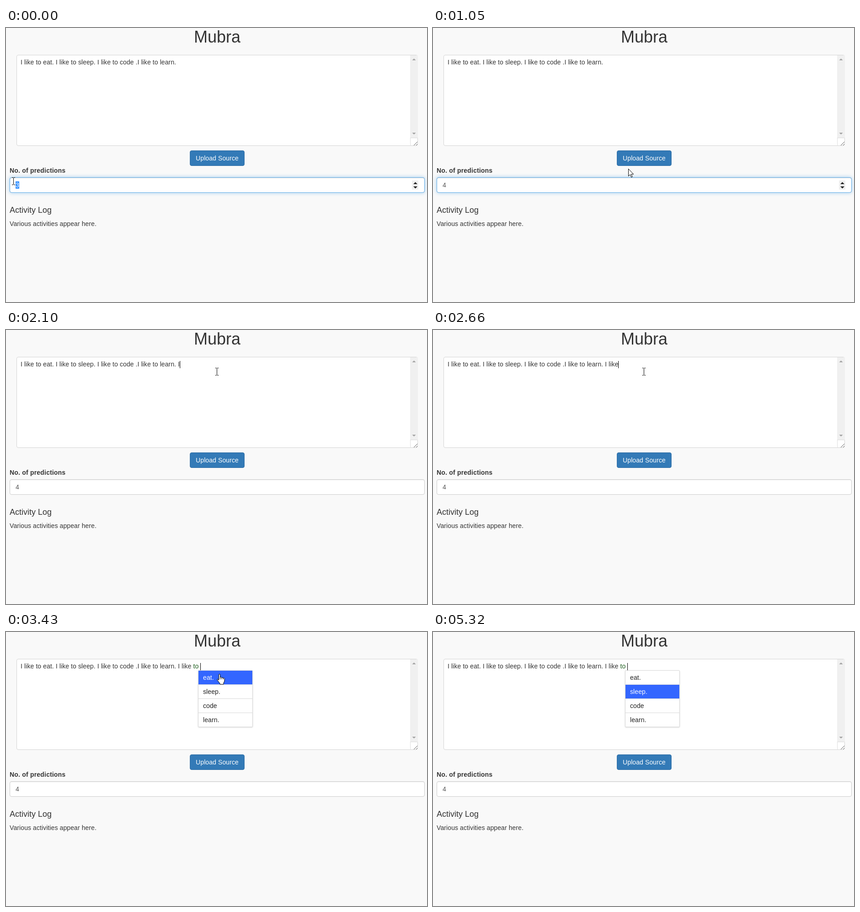
Animation, 923 px wide and 602 px high, one loop 5.53 s. Source, as an HTML page:

```html
<!DOCTYPE html>
<html lang="en">
<head>
<meta charset="utf-8">
<title>Mubra</title>
<style>
  * { box-sizing: border-box; }
  html, body { margin: 0; width: 100%; height: 100%; overflow: hidden; }
  body {
    position: relative; background: #f9f9f9; color: #333; font-kerning: none;
    font: 14px/20px "Liberation Sans", Arial, sans-serif; letter-spacing: .1px; white-space: pre;
  }
  body > * { position: absolute; margin: 0; }
  h1 { left: 0; top: 0; width: 926px; text-align: center; font: 36px/40px "Liberation Sans", sans-serif; letter-spacing: 0; }
  h4 { left: 8px; top: 390px; font: 18px/20px "Liberation Sans", sans-serif; letter-spacing: 0; }
  #area { left: 23px; top: 59px; width: 880px; height: 200px; background: #fff; border: 1px solid #d4d4d4; border-radius: 4px; }
  #text { left: 32px; top: 65px; }
  #typed b { font-weight: normal; color: #175a17; }
  .caret { display: inline-block; width: 1px; height: 16px; margin-right: -1px; background: #000; vertical-align: -4px; }
  #upload {
    left: 403px; top: 269px; width: 120px; height: 34px; line-height: 32px; text-align: center;
    color: #fff; background: #337ab7; border: 1px solid #2e6da4; border-radius: 4px;
  }
  #upload.hover { background: #286090; border-color: #204d74; }
  #label { left: 8px; top: 303px; font-weight: bold; letter-spacing: .2px; }
  .field { left: 8px; top: 328px; width: 910px; height: 34px; border: 1px solid #ccc; border-radius: 4px; }
  #count { background: #fff; box-shadow: inset 0 1px 1px rgba(0,0,0,.075); }
  #glow { border-color: #66afe9; box-shadow: inset 0 1px 1px rgba(0,0,0,.075), 0 0 8px rgba(102,175,233,.6); }
  #value { left: 21px; top: 337px; height: 16px; line-height: 16px; color: #555; }
  #value.selected { color: #fff; background: #3390ff; }
  #numCaret { left: 29px; top: 337px; }
  #popup { top: 84px; width: 120px; background: #fff; border: 1px solid #d8d8d8; border-radius: 2px; box-shadow: 0 1px 3px rgba(0,0,0,.15); color: #222; }
  #popup div { height: 31px; line-height: 30px; padding-left: 10px; border-bottom: 1px solid #d8d8d8; }
  #popup div:last-child { height: 30px; border: 0; }
  #popup .hover { color: #fff; background: #36f; }
  svg { left: 0; top: 0; }
</style>
</head>
<body>
<h1>Mubra</h1>
<div id="area"></div>
<div id="text">I like to eat. I like to sleep. I like to code .I like to learn. <span id="typed"></span><i id="caret" class="caret"></i></div>
<div id="upload">Upload Source</div>
<div id="label">No. of predictions</div>
<div id="count" class="field"></div>
<div id="glow" class="field"></div>
<div id="value"></div>
<i id="numCaret" class="caret"></i>
<h4>Activity Log</h4>
<div style="left:8px;top:420px">Various activities appear here.</div>
<svg width="923" height="602">
  <path fill="#f0f0f0" d="M886 60h17v182h-17z"/>
  <path fill="#a3a3a3" d="M890.5 71l4-4 4 4zM890.5 230l4 4 4-4z"/>
  <path fill="#fff" stroke="#dcdcdc" d="M886.5 258.5v-17h16"/>
  <path fill="none" stroke="#555" d="M894 258l8-8M899 258l3-3"/>
  <g id="spinner">
    <path fill="#f0f0f0" d="M890 335h14v20h-14z"/>
    <path fill="#222" d="M893 343l4.500-4.500 4.500 4.500zM893 348l4.500 4.500 4.500-4.500z"/>
  </g>
</svg>
<div id="popup"></div>
<svg width="923" height="602">
  <g id="pointer" stroke="#000" fill="#fff">
    <path id="arrow" d="M.5.5v16l3.700-3.500 2.600 5.800 2.400-1-2.600-5.600h5z"/>
    <path id="beam" fill="none" d="M-3-7.500h2.500l1 1 1-1H4M.5-6.500v14M-3 8.500h2.500l1-1 1 1H4"/>
    <path id="hand" d="M-1.500 14V2Q-1.500.5 0 .5T1.500 2V8Q2 6.500 3.500 7T5 9Q5.500 7.500 7 8T8.500 10Q9 8.500 10.500 9.500T11 12V16L9 20V23H1V21L-4.500 14Q-5.500 11.500-4 11.500T-1.500 14ZM1.500 8v4M5 9v3M8.500 10v2"/>
  </g>
</svg>
<script>
const LOOP = 5530;
const $ = id => document.getElementById(id);
const show = (id, on) => { $(id).style.visibility = on ? 'visible' : 'hidden'; };
const within = (t, from, to) => t >= from && t < to;

// Pointer steps: time, shape, x, y
const moves = [
  [0, 'beam', 16, 336], [70, 'beam', 114, 352], [140, 'arrow', 270, 388], [210, 'arrow', 315, 395],
  [910, 'arrow', 350, 380], [980, 'beam', 402, 349], [1050, 'arrow', 428, 309],
  [1120, 'hand', 446, 278], [1190, 'beam', 458, 160], [1260, 'beam', 462, 91],
  [2310, 'hand', 468, 92], [2380, 'beam', 462, 91], [2730, 'hand', 468, 92],
  [3290, 'beam', 462, 91], [3430, 'hand', 468, 92], [4200, 'hand', 492, 124],
  [4270, 'beam', 600, 240], [4340, 'arrow', 775, 430], [4410, 'arrow', 909, 590],
  [4620, 'arrow', 899, 594], [4690, 'none', 0, 0]
];
const phrase = 'I like to ';
const keyTimes = [2100, 2240, 2380, 2450, 2590, 2660, 2730, 3290, 3360, 3430];
const suggestions = { 2: ['like'], 7: ['to', 'to'], 10: ['eat.', 'sleep.', 'code', 'learn.'] };

function draw(t) {
  const [, shape, x, y] = moves.findLast(m => m[0] <= t);
  for (const id of ['arrow', 'beam', 'hand']) show(id, id === shape);
  $('pointer').setAttribute('transform', `translate(${x} ${y})`);
  $('upload').className = within(t, 1120, 1190) ? 'hover' : '';

  $('value').textContent = t < 350 ? '3' : '4';
  $('value').className = t < 350 ? 'selected' : '';
  show('numCaret', within(t, 350, 840));
  show('spinner', t < 1470);
  $('glow').style.opacity = t < 1540 ? 1 : t < 1610 ? .5 : 0;

  const typed = keyTimes.filter(k => k <= t).length;
  const text = phrase.slice(0, typed);
  $('typed').innerHTML = `${text.slice(0, 7)}<b>${text.slice(7)}</b>`;
  show('caret', t >= 1470 && !within(t, 3920, 4410) && !within(t, 4830, 5320));

  const items = t >= 2310 && suggestions[typed] || [];
  const active = t < 4200 ? 0 : 1;
  show('popup', items.length);
  $('popup').style.left = $('caret').offsetLeft + 27 + 'px';
  $('popup').innerHTML = items.map((s, i) => `<div class="${i === active ? 'hover' : ''}">${s}</div>`).join('');
}

function tick() {
  draw(performance.now() % LOOP);
  requestAnimationFrame(tick);
}
tick();
</script>
</body>
</html>
```
